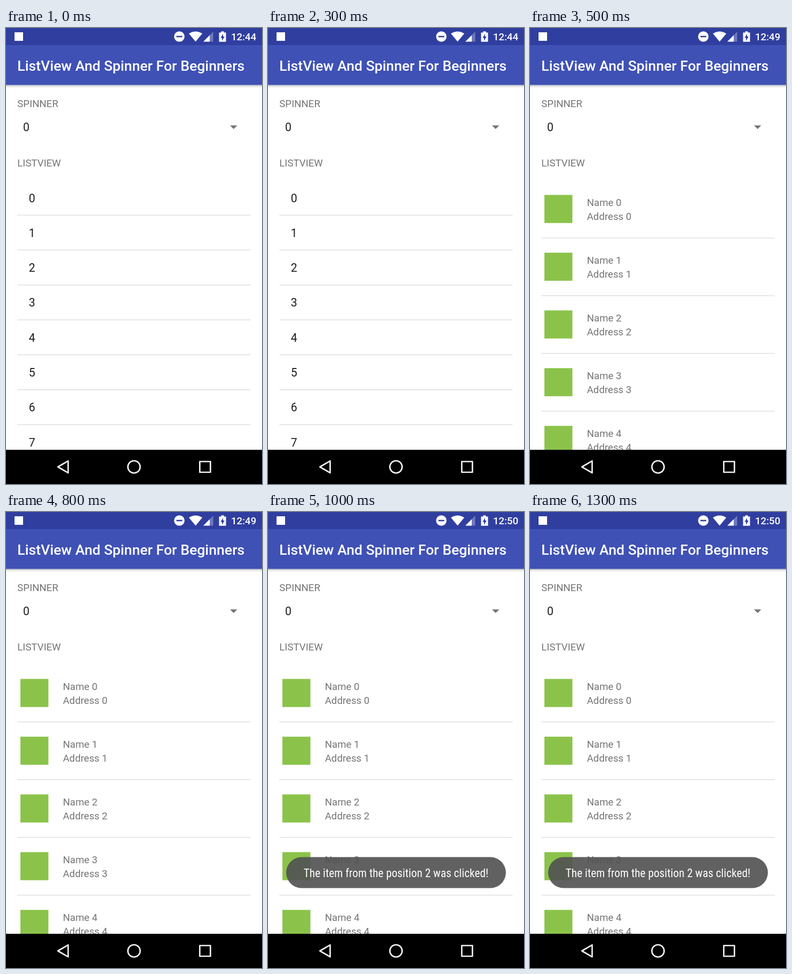
These frames come from a looping animation (480 by 853 pixels, 1500 ms). An HTML page:

```html
<!DOCTYPE html>
<html lang="en">
<head>
<meta charset="utf-8">
<title>ListView And Spinner For Beginners</title>
<style>
  html, body { margin: 0; height: 100%; overflow: hidden; background: #fff; }
  svg { display: block; font: 18.67px Roboto, sans-serif; fill: #757575; }
  .item { font-size: 21.33px; fill: #1c1c1c; }
  .bold { font-weight: 500; fill: #fff; }
  .toast { font: 21.33px "Roboto Condensed", Roboto, sans-serif; font-stretch: condensed; fill: #fff; }
  .nav { fill: none; stroke: #f2f2f2; stroke-width: 2.7; stroke-linejoin: round; }
</style>
</head>
<body>
<svg width="480" height="853" viewBox="0 0 480 853">
  <defs>
    <linearGradient id="shade" x2="0" y2="1">
      <stop stop-opacity=".3"/>
      <stop offset=".4" stop-opacity=".1"/>
      <stop offset="1" stop-opacity="0"/>
    </linearGradient>
  </defs>

  <text x="21.3" y="148">SPINNER</text>
  <text x="32" y="193.3" class="item">0</text>
  <path d="M420 182.3h13.6l-6.8 6.8z"/>
  <text x="21.3" y="258.6">LISTVIEW</text>

  <g id="simple"></g>
  <g id="detailed"></g>
  <g id="toast">
    <rect x="34" y="645.5" width="412" height="58" rx="29" fill="#525252" opacity=".91"/>
    <text x="240" y="682.5" text-anchor="middle" class="toast">The item from the position 2 was clicked!</text>
  </g>

  <rect y="106.5" width="480" height="6" fill="url(#shade)"/>
  <rect width="480" height="106.5" fill="#3f51b5"/>
  <rect width="480" height="32" fill="#303f9f"/>
  <text x="21.3" y="79.6" class="bold" font-size="26.67">ListView And Spinner For Beginners</text>

  <g fill="#fff">
    <rect x="16" y="8" width="16" height="16"/>
    <circle cx="325" cy="16" r="9.8"/>
    <path d="M343 10.5q12.5-8 25 0L355.5 25.5z"/>
    <path d="M388.5 7v18.5H370z" opacity=".3"/>
    <path d="M382 13.5v12H370z"/>
    <path d="M399.5 8.5h4V6.3h5v2.2h4v17.2h-13z"/>
  </g>
  <g fill="#303f9f">
    <rect x="319.5" y="14.7" width="11" height="2.6"/>
    <path d="M407 11v5h2.8l-4.8 8v-5.6h-2.7z"/>
  </g>
  <text id="clock" x="469.3" y="22.7" text-anchor="end" class="bold"></text>

  <rect y="789" width="480" height="64" fill="#000"/>
  <g class="nav">
    <path d="M97.3 821L116.5 809.8v22.4z"/>
    <circle cx="240" cy="821" r="11.5"/>
    <rect x="363.3" y="811" width="20" height="20"/>
  </g>
</svg>
<script>
  const $ = id => document.getElementById(id);
  const repeat = (count, row) => Array.from({ length: count }, (_, i) => row(i)).join("");
  const divider = y => `<rect x="21.3" y="${y}" width="437.4" height="1.4" fill="#dedede"/>`;

  $("simple").innerHTML = repeat(8, i => {
    const y = 285.3 + i * 65.33;
    return `<text x="42.7" y="${y + 40.2}" class="item">${i}</text>` + divider(y + 64);
  });
  $("detailed").innerHTML = repeat(5, i => {
    const y = 285.3 + i * 108;
    return `<rect x="27" y="${y + 27}" width="52.5" height="52.5" fill="#8bc34a"/>
      <text x="106.7" y="${y + 48}">Name ${i}</text>
      <text x="106.7" y="${y + 73.3}">Address ${i}</text>` + divider(y + 106.7);
  });

  const show = (id, on) => $(id).setAttribute("visibility", on ? "visible" : "hidden");
  const start = performance.now();

  function draw() {
    const step = Math.floor((performance.now() - start) / 500) % 3;
    show("simple", step === 0);
    show("detailed", step > 0);
    show("toast", step === 2);
    $("clock").textContent = ["12:44", "12:49", "12:50"][step];
    requestAnimationFrame(draw);
  }
  draw();
</script>
</body>
</html>
```
